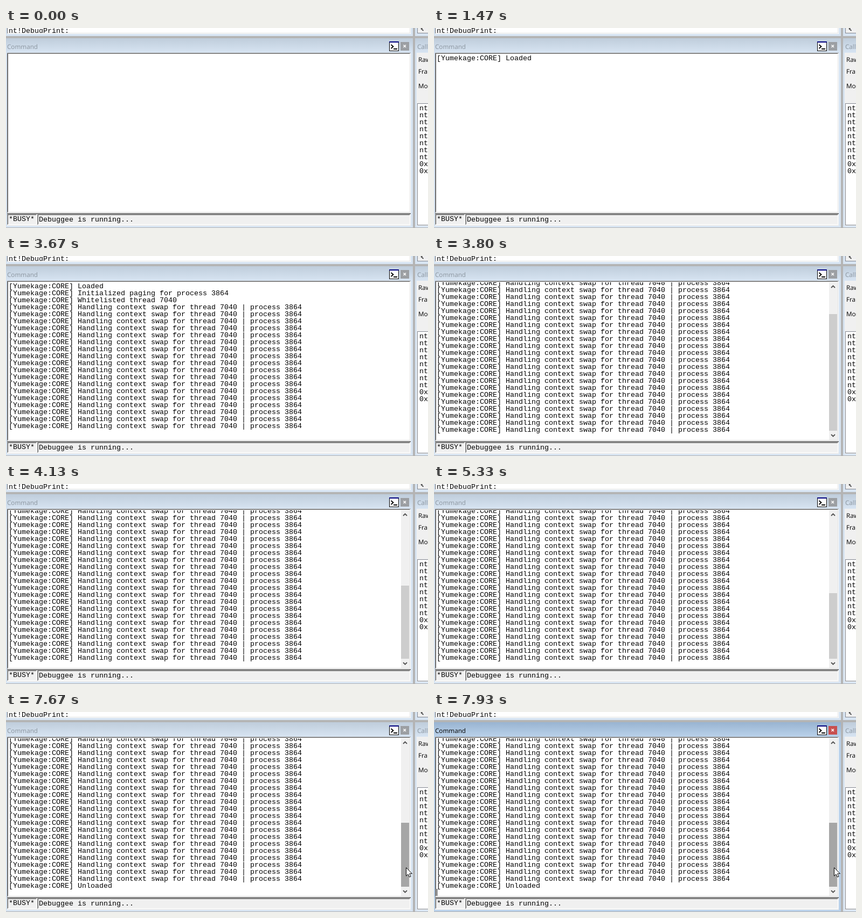
These frames come from a looping animation (783x372 px, 8000 ms). An HTML page:

```html
<!DOCTYPE html>
<html lang="en">
<head>
<meta charset="utf-8">
<title>Debugger command window</title>
<style>
  html, body { margin: 0; width: 100%; height: 100%; overflow: hidden; background: #b4b4b4; }
  svg { display: block; width: 783px; height: 372px; }
  text { white-space: pre; }
  .mono { font: 13.333px "Liberation Mono", "Courier New", monospace; }
  .ui { font: 11.7px "Open Sans", "Noto Sans", sans-serif; text-rendering: geometricPrecision; }
  .dim { fill: #8b959f; }
  .frame { fill: #d7e4f2; }
  .active .frame { fill: #b9d1ea; }
  .caption { fill: url(#idle); }
  .active .caption { fill: url(#focus); }
  .active .dim { fill: #000; }
  .close { fill: #9c9fa3; }
  .active .close { fill: #c84f4f; }
  .chevron { fill: none; stroke: #505050; stroke-width: 1.8; }
</style>
</head>
<body>
<svg viewBox="0 0 783 372" shape-rendering="crispEdges">
  <defs>
    <linearGradient id="idle" x2="0" y2="1">
      <stop stop-color="#bfcddb"/><stop offset="1" stop-color="#d7e4f2"/>
    </linearGradient>
    <linearGradient id="focus" x2="0" y2="1">
      <stop stop-color="#99b4d1"/><stop offset="1" stop-color="#b9d1ea"/>
    </linearGradient>
    <clipPath id="view"><path d="M4 49H749V342H4Z"/></clipPath>
    <clipPath id="topView"><path d="M3 0H749V9H3Z"/></clipPath>
  </defs>

  <!-- window above -->
  <path class="frame" d="M0 0H755V15H0ZM759 0H783V15H759Z"/>
  <path fill="#fff" d="M2 0H751V11H2Z"/>
  <path fill="#e3e3e3" d="M3 9H750V10H3ZM749 0H750V10H749Z"/>
  <path fill="#696969" d="M2 0H3V10H2Z"/>
  <g clip-path="url(#topView)"><text class="mono" x="5" y="9">nt!DebugPrint:</text></g>
  <path fill="#f0f0f0" d="M763 0H783V10H763Z"/>
  <path fill="#828790" d="M763 0H764V10H763ZM763 9H783V10H763Z"/>
  <path class="chevron" shape-rendering="auto" d="M774.5 -2L770.5 1.5L774.5 5"/>

  <!-- call stack window -->
  <path class="frame" d="M759 46H783V371H759Z"/>
  <path class="caption" d="M759 19H783V46H759Z"/>
  <path fill="#f0f0f0" d="M762 46H783V368H762Z"/>
  <path fill="#828790" d="M763 140H783V367H763Z"/>
  <path fill="#fff" d="M764 141H783V366H764Z"/>
  <g class="ui">
    <text class="dim" x="763" y="39">Calls</text>
    <text x="765" y="63">Raw args</text>
    <text x="765" y="85">Frame nums</text>
    <text x="765" y="112">More</text>
  </g>
  <g id="stack" class="mono"></g>

  <!-- command window -->
  <g id="command">
    <path class="frame" d="M0 46H755V371H0Z"/>
    <path class="caption" d="M0 19H755V46H0Z"/>
    <text class="ui dim" x="2" y="39">Command</text>
    <path d="M711 25H729V43H711Z"/>
    <path fill="#000080" d="M711 25H729V27H711Z"/>
    <path fill="#fff" d="M712 27H728V42H712Z"/>
    <path d="M714.5 31L718.5 34.500L714.500 38" fill="none" stroke="#000" stroke-width="1.8" shape-rendering="auto"/>
    <path d="M719 38H726V40H719Z"/>
    <path class="close" d="M732 26H748V42H732Z"/>
    <path d="M737.5 31.5L742 36M742 31.5L737.5 36" stroke="#fff" stroke-width="1.5" shape-rendering="auto"/>

    <path fill="#a0a0a0" d="M2 46H751V344H2Z"/>
    <path fill="#fff" d="M3 47H751V344H3Z"/>
    <path fill="#696969" d="M2 47H749V48H2ZM2 47H4V342H3V343H2Z"/>
    <path fill="#e3e3e3" d="M749 47H750V343H3V342H749Z"/>

    <path fill="#f0f0f0" d="M2 344H751V368H2Z"/>
    <path fill="#a0a0a0" d="M2 344H751V345H2Z"/>
    <path fill="#696969" d="M2 345H751V346H2Z"/>
    <path fill="#a0a0a0" d="M2 346H57V347H3V366H2ZM58 346H750V347H59V366H58Z"/>
    <path fill="#696969" d="M3 347H56V348H4V365H3ZM59 347H749V348H60V365H59Z"/>
    <path fill="#fff" d="M56 347H57V366H3V365H56ZM749 347H750V366H59V365H749Z"/>
    <text class="mono" x="5" y="359">*BUSY*</text>
    <text class="mono" x="61" y="360">Debuggee is running...</text>

    <g clip-path="url(#view)"><g id="log" class="mono"></g></g>
    <path id="caret" d="M5 329H6V342H5Z"/>
    <g id="scrollbar">
      <path fill="#f0f0f0" d="M733 49H749V342H733Z"/>
      <rect id="thumb" x="733" width="15"/>
      <g class="chevron" shape-rendering="auto">
        <path d="M737 59L740.5 55.5L744 59"/>
        <path d="M737 332L740.5 335.5L744 332"/>
      </g>
    </g>
  </g>

  <path id="beam" fill="none" stroke="#000" d="M-3.5 -7.5H-1L0.5 -6.5L2 -7.5H4.5M0.5 -6.5V6.5M-3.5 7.5H-1L0.5 6.5L2 7.5H4.5"/>
  <path id="arrow" fill="#fff" stroke="#000" shape-rendering="auto" d="M0.5 0.5V16L4 12.7L6.5 18L9 17L6.7 11.7H11.5Z"/>
</svg>
<script>
const LOOP = 8000, ROW = 13, VISIBLE = 22;
const $ = id => document.getElementById(id);
const show = (el, on) => el.setAttribute('visibility', on ? 'visible' : 'hidden');

// [time, lines printed so far]
const output = [
  [0, 0], [1470, 1], [3470, 2], [3530, 8], [3600, 15], [3670, 21],
  [3800, 27], [3870, 30], [3930, 33], [4000, 37], [4070, 40], [4130, 43],
  [4200, 47], [5330, 48], [6000, 49]
];

// [time, x, y]
const pointer = [
  [7130, 727, 290], [7200, 725, 291], [7270, 726, 291], [7330, 729, 291],
  [7400, 734, 290], [7470, 738, 289], [7530, 741, 289], [7670, 742, 289]
];
const FOCUS_TIME = 7930;

const at = (steps, t) => steps.filter(s => s[0] <= t).pop();

function addText(parent, x, y, content = '') {
  const el = document.createElementNS('http://www.w3.org/2000/svg', 'text');
  el.setAttribute('x', x);
  el.setAttribute('y', y);
  el.textContent = content;
  return parent.appendChild(el);
}

function message(i) {
  const special = {
    0: 'Loaded',
    1: 'Initialized paging for process 3864',
    2: 'Whitelisted thread 7040',
    48: 'Unloaded'
  };
  return '[Yumekage:CORE] ' +
    (special[i] || 'Handling context swap for thread 7040 | process 3864');
}

for (let i = 0; i < 10; i++) addText($('stack'), 767, 153 + i * ROW, i < 8 ? 'nt!' : '0xf');
const rows = Array.from({ length: VISIBLE }, (_, i) => addText($('log'), 5, 60 + i * ROW));

let shown = -1;
function printLog(count) {
  if (count === shown) return;
  shown = count;
  const first = Math.max(0, count - VISIBLE);
  const scrolled = first > 0;
  rows.forEach((row, i) => {
    row.textContent = first + i < count ? message(first + i) : '';
  });
  $('log').setAttribute('transform', `translate(0 ${scrolled ? -6 : 0})`);
  show($('scrollbar'), scrolled);
  if (scrolled) {
    const height = Math.floor(217 * 27 / count);
    $('thumb').setAttribute('y', 325 - height);
    $('thumb').setAttribute('height', height);
  }
}

function draw(t) {
  printLog(at(output, t)[1]);

  const [, x, y] = at(pointer, t) || [0, -50, -50];
  const hover = x >= 733;
  show($('beam'), x > 0 && !hover);
  show($('arrow'), hover);
  for (const id of ['beam', 'arrow']) $(id).setAttribute('transform', `translate(${x} ${y})`);
  $('thumb').setAttribute('fill', hover ? '#a6a6a6' : '#cdcdcd');

  const focused = t >= FOCUS_TIME;
  $('command').classList.toggle('active', focused);
  show($('caret'), focused);
}

const start = performance.now();
function tick() {
  draw((performance.now() - start) % LOOP);
  requestAnimationFrame(tick);
}
tick();
</script>
</body>
</html>
```
